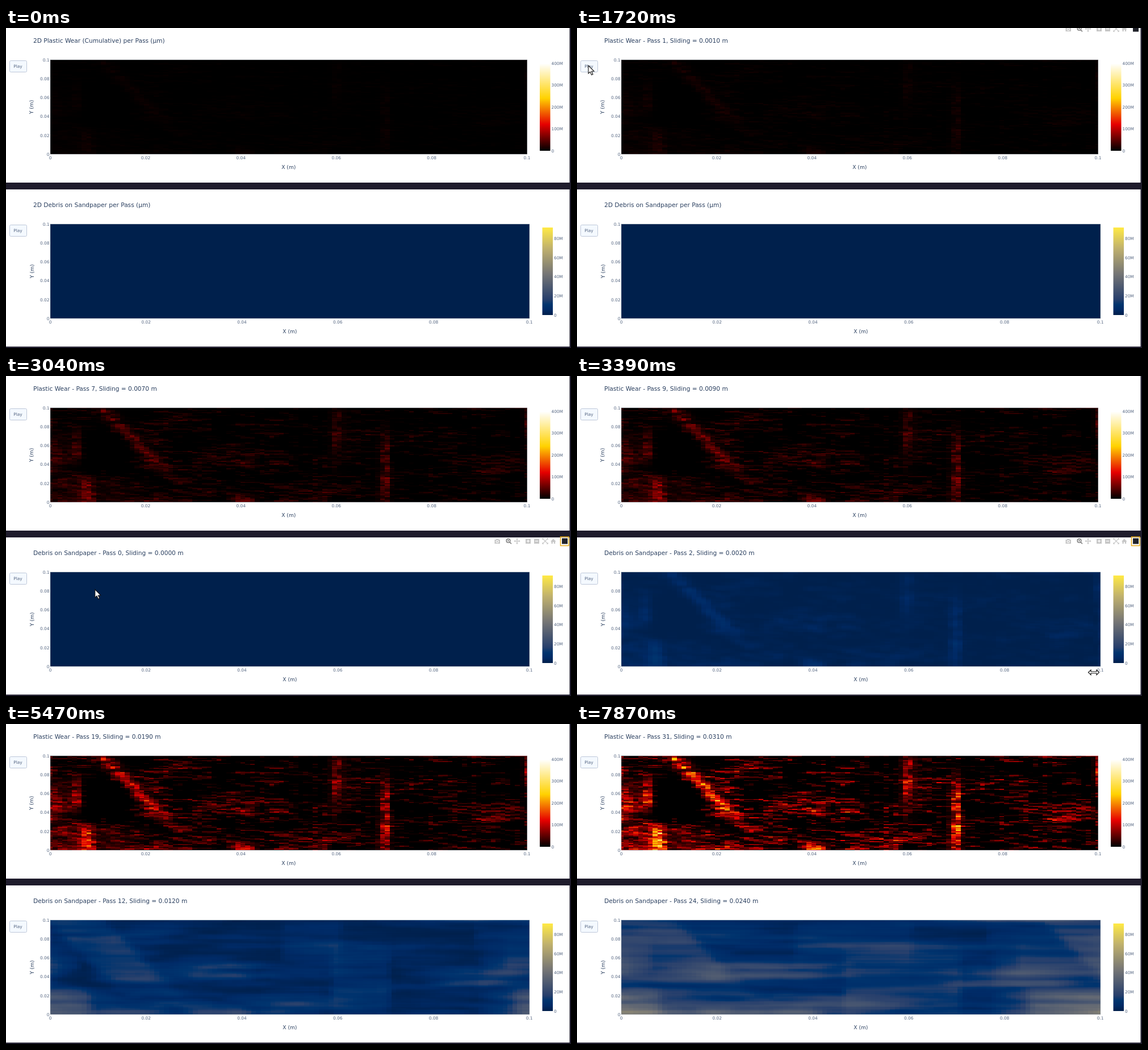
An HTML page with a canvas that plays this animation: 995 px wide and 563 px high, repeating every 8000 ms.

```html
<!DOCTYPE html>
<html lang="en">
<head>
<meta charset="utf-8">
<title>Wear and debris heatmaps</title>
<style>
html, body { margin: 0; width: 100%; height: 100%; overflow: hidden; background: #1f1c2c; }
canvas { display: block; }
</style>
</head>
<body>
<canvas id="stage" width="995" height="563"></canvas>
<script>
const ctx = document.getElementById('stage').getContext('2d');
const LOOP = 8000, N = 100, LOWER = 289;
const INK = '#2a3f5f', TICK = '#556681';

const clamp = v => Math.max(0, Math.min(1, v));
const mix = (a, b, k) => a + (b - a) * k;
const bell = d => Math.exp(-d * d);

// ---- colour scales: position, red, green, blue ----
const HOT = [[0, 0, 0, 0], [.3, 230, 0, 0], [.6, 255, 210, 0], [1, 255, 255, 255]];
const CIVIDIS = [
  [0, 0, 32, 76], [.06, 0, 42, 102], [.118, 0, 52, 110], [.176, 39, 63, 108],
  [.47, 117, 117, 117], [.765, 192, 177, 109], [1, 255, 233, 69]
];
function shade(scale, v) {
  v = clamp(v);
  const i = Math.max(1, scale.findIndex(s => s[0] >= v));
  const [p, ...a] = scale[i - 1], [q, ...b] = scale[i];
  return a.map((x, j) => Math.round(mix(x, b[j], (v - p) / (q - p))));
}

// ---- wear per pass, in millions, on a 100 x 100 grid ----
function hash(a, b) {
  let h = Math.imul(a + 911, 374761393) + Math.imul(b + 577, 668265263);
  h = Math.imul(h ^ (h >>> 13), 1274126177);
  return ((h ^ (h >>> 16)) >>> 0) / 4294967296;
}
function noise(x, y) {
  const i = Math.floor(x), j = Math.floor(y), u = x - i, v = y - j;
  return mix(mix(hash(i, j), hash(i + 1, j), u), mix(hash(i, j + 1), hash(i + 1, j + 1), u), v);
}

// zones of strong or weak contact: column, row, half width, half height, strength
const ZONES = [
  [5.5, 40, 1.1, 18, 4.5], [7.6, 90, 1.2, 16, 6], [6, 92, 9, 18, 2.4], [1, 47, 2.5, 20, 2.6],
  [40, 97, 2, 6, 7], [59.5, 30, 1.2, 32, 3], [69.5, 66, 1, 40, 5.5], [99.5, 14, 1, 18, 4],
  [12, 46, 4, 20, -4], [75, 48, 5, 14, -1.5], [28, 45, 3, 25, -1]
];

function contact(c, r) {
  const ridge = 5.5 * bell((c - 10.5 - r * .2) / 1.7) * bell((r / 68) ** 4);
  return ZONES.reduce((sum, [x, y, w, h, k]) =>
    sum + k * bell((c - x) / w) * bell(((r - y) / h) ** 2), ridge);
}

const wear = Array.from({ length: N * N }, (_, i) => {
  const c = i % N, r = Math.floor(i / N), slant = r - Math.floor(c * .2);
  const drift = noise(c / 9 + 50, r / 14 + 50);
  const streak = Math.max(0, noise(c / 2.2, slant * .9) + .5 * drift + r / 1500 - .8);
  const rough = 1.5 * noise(c * .9 + 200, r * .6) * (.6 + .8 * hash(c, r + 400));
  const zone = contact(c, r);
  return Math.max(0, streak * 7 * (.5 + hash(c + 300, r)) + zone * (zone > 0 ? rough : 1));
});

// the sheet picks up a softened copy of the wear
const rowOf = r => Math.max(0, Math.min(N - 1, r));
const soil = wear.map((_, i) => {
  const c = i % N, r = Math.floor(i / N);
  let sum = 0;
  for (let k = -2; k <= 2; k++) sum += wear[rowOf(r + k) * N + c];
  return sum / 5;
});

const wornAt = (i, n) => wear[i] * (n + 1) / 400;

// it advances one column per pass, wrapping round
function debrisAt(i, n) {
  const c = i % N, row = i - c;
  let sum = 0;
  for (let k = 0; k < n; k++) sum += soil[row + (c + k) % N];
  return sum * .8 / 91.7;
}

function heatmap(scale, valueAt) {
  const cv = document.createElement('canvas');
  cv.width = cv.height = N;
  const g = cv.getContext('2d'), img = g.createImageData(N, N);
  let shown = -1;
  return n => {
    if (n !== shown) {
      for (let i = 0; i < N * N; i++) img.data.set([...shade(scale, valueAt(i, n)), 255], i * 4);
      g.putImageData(img, 0, 0);
      shown = n;
    }
    return cv;
  };
}
const wearMap = heatmap(HOT, wornAt), debrisMap = heatmap(CIVIDIS, debrisAt);

// ---- drawing helpers ----
function text(str, x, y, size, align = 'left', color = TICK) {
  ctx.font = size + 'px "DejaVu Sans", Verdana, sans-serif';
  ctx.textAlign = align;
  ctx.textBaseline = 'alphabetic';
  ctx.fillStyle = color;
  ctx.fillText(str, x, y + size * .365);
}
function poly(points, close = true) {
  ctx.beginPath();
  points.forEach(([x, y]) => ctx.lineTo(x, y));
  if (close) ctx.closePath();
}
function line(...points) {
  poly(points, false);
  ctx.stroke();
}
function dot(x, y, r, color) {
  ctx.fillStyle = color;
  ctx.beginPath();
  ctx.arc(x, y, r, 0, 7);
  ctx.fill();
}

function panel({ top, title, map, right, scale, bar, step, stepPx }) {
  const left = 78, width = right - left, y0 = top + 56, h = 166;
  text(title, 48, top + 21.7, 10.6, 'left', INK);

  ctx.beginPath();
  ctx.roundRect(6.5, top + 57.5, 30, 20, 2);
  ctx.fillStyle = '#f4f9ff';
  ctx.fill();
  ctx.strokeStyle = '#bec8d9';
  ctx.lineWidth = 1;
  ctx.stroke();
  text('Play', 21, top + 67, 7.4, 'center');

  // outer cells are cut in half by the axis range
  ctx.imageSmoothingEnabled = false;
  ctx.drawImage(map, .5, .5, N - 1, N - 1, left, y0, width, h);
  ctx.strokeStyle = 'rgba(150, 155, 165, .45)';
  ctx.strokeRect(left, y0, width, h);

  for (let i = 0; i <= 5; i++) {
    const label = i ? String(i * 2 / 100) : '0';
    text(label, left + width * i / 5, y0 + h + 6, 7.4, 'center');
    text(label, 76.5, y0 + h * (1 - i / 5), 7.4, 'right');
  }
  text('X (m)', left + width / 2, top + 244.3, 9.1, 'center', INK);
  ctx.save();
  ctx.translate(top ? 46 : 45, y0 + h / 2);
  ctx.rotate(-Math.PI / 2);
  text('Y (m)', 0, 0, 9.1, 'center', INK);
  ctx.restore();

  for (let y = 0; y < 154; y++) {
    ctx.fillStyle = `rgb(${shade(scale, 1 - y / 153)})`;
    ctx.fillRect(bar, top + 62 + y, 18.5, 1);
  }
  for (let i = 0; i < 5; i++)
    text(i ? i * step + 'M' : '0', bar + 20.5, top + 216 - i * stepPx, 7.3);
}

function toolbar(y, alpha, ring) {
  if (alpha <= 0) return;
  const pale = '#c7c7c7';
  ctx.save();
  ctx.globalAlpha = alpha;
  ctx.translate(0, y);
  ctx.fillStyle = ctx.strokeStyle = pale;
  ctx.lineWidth = 1.3;

  // camera
  ctx.fillRect(860.5, -2.5, 9.5, 7);
  ctx.fillRect(863, -4, 4.5, 2);
  dot(865.2, .8, 2.5, '#fff');
  dot(865.2, .8, 1.4, pale);

  // pan
  for (let k = 0; k < 4; k++) {
    ctx.save();
    ctx.translate(900, 0);
    ctx.rotate(k * Math.PI / 2);
    line([0, 0], [5, 0]);
    poly([[5.5, 0], [3, -2], [3, 2]]);
    ctx.fill();
    ctx.restore();
  }

  // zoom in, zoom out
  for (const x of [919.5, 934.5]) {
    ctx.fillRect(x - 4.5, -4, 9, 8.5);
    ctx.strokeStyle = '#fff';
    line([x - 2.5, 0], [x + 2.5, 0]);
    if (x < 930) line([x, -2.5], [x, 2.5]);
  }

  // autoscale
  ctx.strokeStyle = pale;
  ctx.lineWidth = 1.1;
  for (const sx of [-1, 1]) for (const sy of [-1, 1]) {
    const at = (u, v) => [949.5 + sx * u, sy * v];
    line(at(0, 0), at(4.6, 4.6));
    line(at(2.5, 4.7), at(4.7, 4.7), at(4.7, 2.5));
  }

  // home
  poly([[959, .5], [963.8, -4], [968.6, .5]]);
  ctx.fill();
  ctx.fillRect(960.4, 0, 2.4, 4.5);
  ctx.fillRect(964.8, 0, 2.4, 4.5);
  ctx.fillRect(960.4, 0, 6.8, 1.5);

  // magnifier, the active tool
  ctx.strokeStyle = '#777';
  ctx.lineWidth = 1.5;
  ctx.beginPath();
  ctx.arc(884.5, -.7, 3.3, 0, 7);
  ctx.stroke();
  line([887, 1.8], [890, 4.8]);
  ctx.lineWidth = 1;
  line([883, -.7], [886, -.7]);
  line([884.5, -2.2], [884.5, .8]);

  ctx.fillStyle = '#20222a';
  ctx.fillRect(979, -5, 10, 10);
  if (ring) {
    ctx.strokeStyle = '#e8ac1c';
    ctx.lineWidth = 1.5;
    ctx.strokeRect(976.5, -7.5, 14.5, 15.5);
  }
  ctx.restore();
}

// ---- pointer: time, x, y ----
const PATH = [
  [70, 0, 509], [820, 12, 358], [960, 15, 174], [1250, 20, 66], [1750, 20, 66],
  [2480, 19, 345], [2990, 20, 352], [3320, 905, 505]
];
function outline(points) {
  poly(points);
  ctx.fillStyle = '#fff';
  ctx.fill();
  ctx.strokeStyle = '#111';
  ctx.lineWidth = 1.1;
  ctx.stroke();
}
function pointer(t) {
  if (t < 70 || t >= 3460) return;
  ctx.save();
  if (t >= 3320) {
    ctx.translate(910, 521.5);
    const half = [[-9.5, 0], [-5, -4.5], [-5, -1.5], [5, -1.5], [5, -4.5]];
    outline([...half, ...half.map(([x, y]) => [-x, -y])]);
  } else {
    const i = PATH.findIndex(p => p[0] > t), [t0, x0, y0] = PATH[i - 1], [t1, x1, y1] = PATH[i];
    const k = (t - t0) / (t1 - t0);
    ctx.translate(mix(x0, x1, k), mix(y0, y1, k));
    outline([[0, 0], [0, 14], [3.2, 11.2], [5.6, 16.6], [8, 15.5], [5.6, 10.3], [10, 10.1]]);
  }
  ctx.restore();
}

// ---- timing ----
const ramp = (t, a, b) => clamp((t - a) / (b - a));
const pulse = (t, a, b, c, d) => ramp(t, a, b) - ramp(t, c, d);

// passes come slightly slower until both maps run in step
function wearPass(t) {
  return t < 4870 ? 1 + Math.floor((t - 1720) / 205) : 16 + Math.floor((t - 4870) / 200);
}
function debrisPass(t) {
  return t < 4870 ? Math.floor((t - 2975) / 205) : wearPass(t) - 7;
}
function heading(name, n, idle) {
  return n < 0 ? idle : `${name} - Pass ${n}, Sliding = ${(n / 1000).toFixed(4)} m`;
}

function draw(t) {
  ctx.fillStyle = '#1f1c2c';
  ctx.fillRect(0, 0, 995, 563);
  ctx.fillStyle = '#fff';
  ctx.fillRect(0, 0, 992.5, 272);
  ctx.fillRect(0, 284, 992.5, 276.5);

  const w = wearPass(t), d = debrisPass(t);
  panel({
    top: 0, right: 917.5, map: wearMap(Math.max(0, w)), scale: HOT,
    title: heading('Plastic Wear', w, '2D Plastic Wear (Cumulative) per Pass (µm)'),
    bar: 940, step: 100, stepPx: 38.5
  });
  panel({
    top: LOWER, right: 921.7, map: debrisMap(Math.max(0, d)), scale: CIVIDIS,
    title: heading('Debris on Sandpaper', d, '2D Debris on Sandpaper per Pass (µm)'),
    bar: 944.5, step: 20, stepPx: 33.6
  });
  toolbar(1.5, pulse(t, 890, 1020, 2200, 2400), false);
  toolbar(290.5, pulse(t, 70, 270, 970, 1170) + pulse(t, 2230, 2430, 3550, 3800), t > 2200);
  pointer(t);
}

const start = performance.now();
function tick() {
  draw((performance.now() - start) % LOOP);
  requestAnimationFrame(tick);
}
tick();
</script>
</body>
</html>
```
